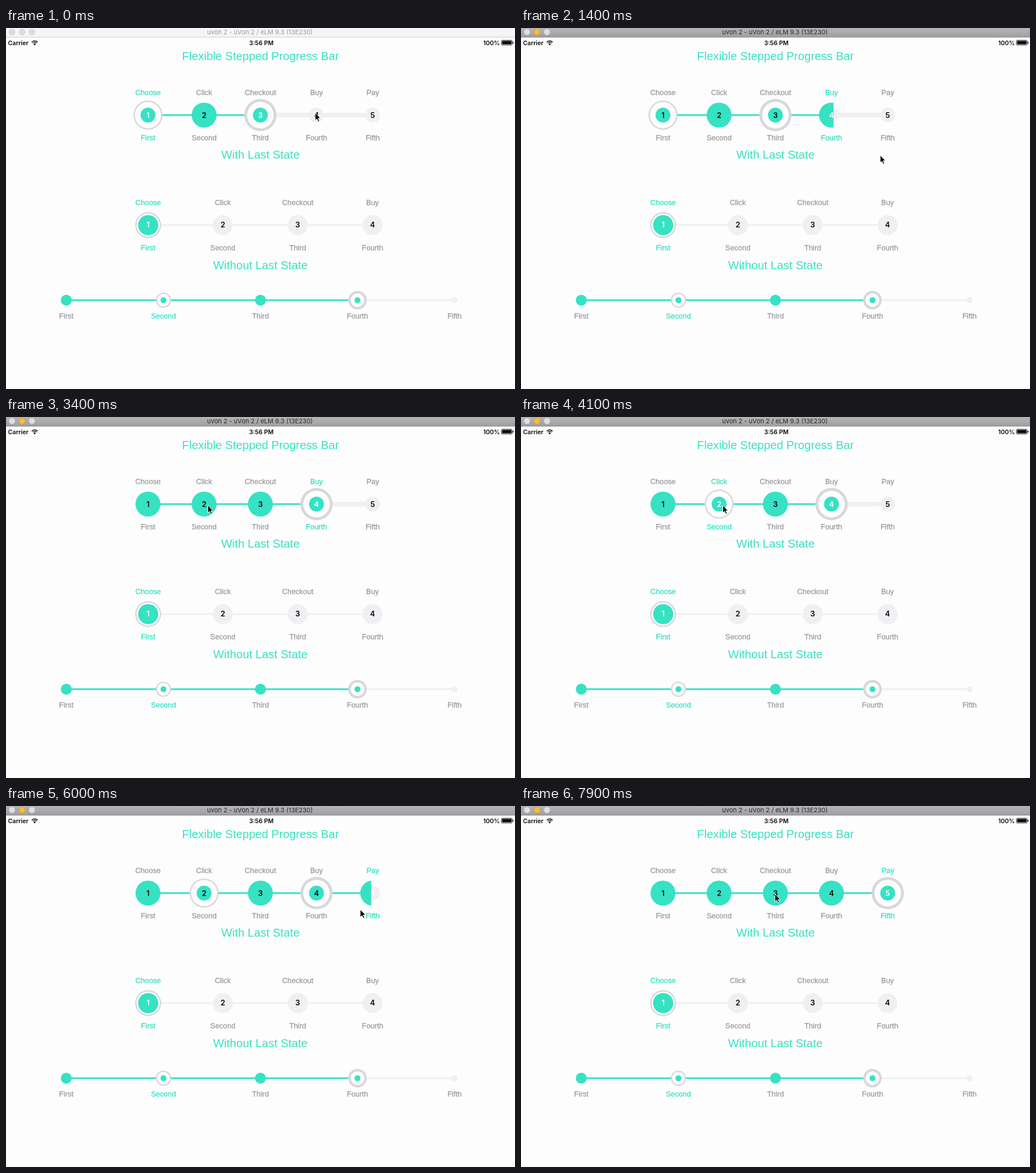
These frames come from a looping animation (889x630 px, 8000 ms). An HTML page with a canvas:

```html
<!DOCTYPE html>
<html lang="en">
<head>
<meta charset="utf-8">
<title>Stepped progress bars</title>
<style>
html, body { margin: 0; width: 100%; height: 100%; overflow: hidden; background: #fefdfe; }
canvas, svg { position: absolute; left: 0; top: 0; width: 889px; height: 630px; display: block; }
text { text-anchor: middle; }
.head { font: 20.2px "Liberation Sans", Arial, sans-serif; }
.label { font: 12.9px "Liberation Sans", Arial, sans-serif; stroke-width: .35px; }
.digit { font: 600 13px Inter, sans-serif; }
.bar { font: 400 11px Inter, sans-serif; }
.status { font: 600 10.6px Inter, sans-serif; }
.left { text-anchor: start; }
</style>
</head>
<body>
<canvas id="stage" width="889" height="630"></canvas>
<svg id="over" viewBox="0 0 889 630">
  <g id="words"></g>
  <g id="cursor">
    <path d="M0 0V13.4L3.1 10.6L5.2 15.4L7.5 14.4L5.4 9.7H9.4Z" fill="#000" stroke="#fff" stroke-width="1" stroke-linejoin="round"/>
  </g>
</svg>
<script>
const LOOP = 8000;
const TEAL = '#36e2c3', PALE = '#f0eff2', RING = '#d8d7da', PAPER = '#fefdfe';
const GREY = '#9d9ca0', INK = '#0a0a0a', WHITE = '#fff';
const ctx = document.getElementById('stage').getContext('2d');
const words = document.getElementById('words');
const cursor = document.getElementById('cursor');

const XS = [248, 346, 444.3, 542.3, 640.5];
const XS2 = [248.3, 378.7, 509.5, 640.2];
const XS3 = [105.3, 275, 444.4, 613.9, 783.5];
const TOP = ['Choose', 'Click', 'Checkout', 'Buy', 'Pay'];
const ORDER = ['First', 'Second', 'Third', 'Fourth', 'Fifth'];

// when steps are picked, and when the finished look settles
const PICK4 = 750, PICK2 = 3550, PICK5 = 5400;
const WIPE = 800, SETTLE = 1600, ACTIVE = 400;

// pointer stops: time, x, y
const PATH = [
  [0, 540, 148], [850, 540, 148], [1350, 627.3, 222], [1650, 627.3, 222],
  [2400, 441, 190], [3200, 352.5, 154], [4250, 352.5, 154], [5100, 632, 154.5],
  [5600, 632, 154.5], [6500, 600.3, 217], [7000, 600.3, 217], [7800, 443.5, 153.5],
  [LOOP, 443.5, 153.5]
];

function addText(str, x, y, cls, fill) {
  const el = document.createElementNS('http://www.w3.org/2000/svg', 'text');
  el.textContent = str;
  el.setAttribute('class', cls);
  el.setAttribute('x', x);
  el.setAttribute('y', y);
  words.appendChild(el);
  tint(el, fill);
  return el;
}

function tint(el, fill) {
  el.setAttribute('fill', fill);
  if (el.classList.contains('label')) el.setAttribute('stroke', fill);
}

const barTitle = addText('uvon 2 - uVon 2 / eLM 9.3 (13E230)', 443.5, 11, 'bar', '#999');
addText('Carrier', 3.5, 30, 'status left', INK);
addText('3:56 PM', 446, 30, 'status', INK);
addText('100%', 848, 30, 'status', INK);
addText('Flexible Stepped Progress Bar', 444.5, 56, 'head', TEAL);
addText('With Last State', 444.5, 227.7, 'head', TEAL);
addText('Without Last State', 444.3, 420.7, 'head', TEAL);

const steps = XS.map((x, i) => ({
  digit: addText(i + 1, x, 156.6, 'digit', INK),
  labels: [addText(TOP[i], x, 117.3, 'label', GREY), addText(ORDER[i], x, 195.8, 'label', GREY)]
}));
XS2.forEach((x, i) => {
  const fill = i ? GREY : TEAL;
  addText(TOP[i], x, 309.3, 'label', fill);
  addText(ORDER[i], x, 388, 'label', fill);
  addText(i + 1, x, 348.4, 'digit', i ? INK : WHITE);
});
XS3.forEach((x, i) => addText(ORDER[i], x, 506.5, 'label', i === 1 ? TEAL : GREY));

function disc(x, y, r, fill) {
  ctx.fillStyle = fill;
  ctx.beginPath();
  ctx.arc(x, y, r, 0, Math.PI * 2);
  ctx.fill();
}

function ringed(x, y, outer, width, inner) {
  disc(x, y, outer, RING);
  disc(x, y, outer - width, PAPER);
  disc(x, y, inner, TEAL);
}

function line(x1, x2, y, h, fill) {
  ctx.fillStyle = fill;
  ctx.fillRect(x1, y - h / 2, x2 - x1, h);
}

function windowBar(on) {
  const g = ctx.createLinearGradient(0, 0, 0, 16);
  g.addColorStop(0, on ? '#b6b4b6' : '#f7f6f7');
  g.addColorStop(1, on ? '#a09ea0' : '#f5f4f5');
  ctx.fillStyle = g;
  ctx.fillRect(0, 0, 889, 16);
  ctx.fillStyle = on ? '#858386' : '#cfced0';
  ctx.fillRect(0, 15.5, 889, 1);
  [10.5, 28, 45.3].forEach((x, i) => {
    const lit = on && i === 1;
    disc(x, 7, 5.5, lit ? '#e0a02c' : on ? '#c9c7c9' : '#cccbcc');
    disc(x, 7, 4.8, lit ? '#fdbb2e' : on ? '#e0dfe0' : '#dddcdd');
  });
}

function statusIcons() {
  ctx.strokeStyle = INK;
  ctx.lineWidth = 1.5;
  [4.3, 7].forEach(r => {
    ctx.beginPath();
    ctx.arc(50, 29.5, r, -Math.PI * .76, -Math.PI * .24);
    ctx.stroke();
  });
  disc(50, 28.6, 1.5, INK);
  ctx.lineWidth = .8;
  ctx.beginPath();
  ctx.roundRect(865.2, 21.4, 19, 8.4, 1.8);
  ctx.stroke();
  ctx.fillStyle = INK;
  ctx.beginPath();
  ctx.roundRect(866.4, 22.6, 16.6, 6, 1);
  ctx.roundRect(884.9, 24, 1.5, 3.2, .7);
  ctx.fill();
}

function topBar(t) {
  const y = 152, R = 21.8;
  const cur = t < PICK4 ? 0 : t < PICK2 ? 3 : t < PICK5 ? 1 : 4;
  const last = t < PICK4 + SETTLE ? 2 : t < PICK5 + SETTLE ? 3 : 4;
  const ring = t < PICK4 + SETTLE ? 0 : t >= PICK2 && t < PICK5 + SETTLE ? 1 : -1;
  const target = t < PICK4 ? 2 : t < PICK5 ? 3 : 4;
  const since = target === 3 ? t - PICK4 : t - PICK5;
  const part = target === 2 ? 1 : Math.min(1, since / WIPE);
  const edge = XS[target] + R - (XS[target] - XS[target - 1]) * (1 - part);

  line(XS[0], XS[4], y, 8, PALE);
  XS.forEach(x => disc(x, y, 13, PALE));

  ctx.save();
  ctx.beginPath();
  ctx.rect(0, 110, part < 1 ? edge : XS[target] + 30, 90);
  ctx.clip();
  line(XS[0], XS[target], y, 10, PAPER);
  line(XS[0], XS[target], y, 3, TEAL);
  for (let i = 0; i <= target; i++) {
    if (i === last) ringed(XS[i], y, 28.2, 5, 13);
    else if (i === ring) ringed(XS[i], y, 25.4, 2.5, 13);
    else disc(XS[i], y, R, TEAL);
  }
  ctx.restore();

  steps.forEach((s, i) => {
    s.labels.forEach(el => tint(el, i === cur ? TEAL : GREY));
    const pale = i === cur || i === 2 && cur === 0 || i === 3 && cur === 1;
    tint(s.digit, pale ? WHITE : INK);
  });
}

function middleBar() {
  const y = 344;
  line(XS2[0], XS2[3], y, 3, PALE);
  XS2.forEach((x, i) => i ? disc(x, y, 17.5, PALE) : ringed(x, y, 22.7, 2.4, 17.6));
}

function bottomBar() {
  const y = 475;
  line(XS3[3], XS3[4], y, 3, PALE);
  line(XS3[0], XS3[3], y, 3, TEAL);
  disc(XS3[0], y, 9.6, TEAL);
  ringed(XS3[1], y, 13.3, 2.4, 5.2);
  disc(XS3[2], y, 9.6, TEAL);
  ringed(XS3[3], y, 16.2, 4.4, 5.2);
  disc(XS3[4], y, 5.2, PALE);
}

function placeCursor(t) {
  const i = PATH.findIndex(p => p[0] > t);
  const a = PATH[i - 1], b = PATH[i];
  const k = (t - a[0]) / (b[0] - a[0]);
  const e = k * k * (3 - 2 * k);
  const x = a[1] + (b[1] - a[1]) * e, y = a[2] + (b[2] - a[2]) * e;
  cursor.setAttribute('transform', `translate(${x} ${y})`);
}

function draw(now) {
  const t = Math.max(0, now) % LOOP;
  const on = t >= ACTIVE;
  ctx.fillStyle = PAPER;
  ctx.fillRect(0, 0, 889, 630);
  windowBar(on);
  tint(barTitle, on ? '#2b2a2b' : '#9a999a');
  statusIcons();
  topBar(t);
  middleBar();
  bottomBar();
  placeCursor(t);
}

const start = performance.now();
function tick(now) {
  draw(now - start);
  requestAnimationFrame(tick);
}
draw(0);
requestAnimationFrame(tick);
</script>
</body>
</html>
```
